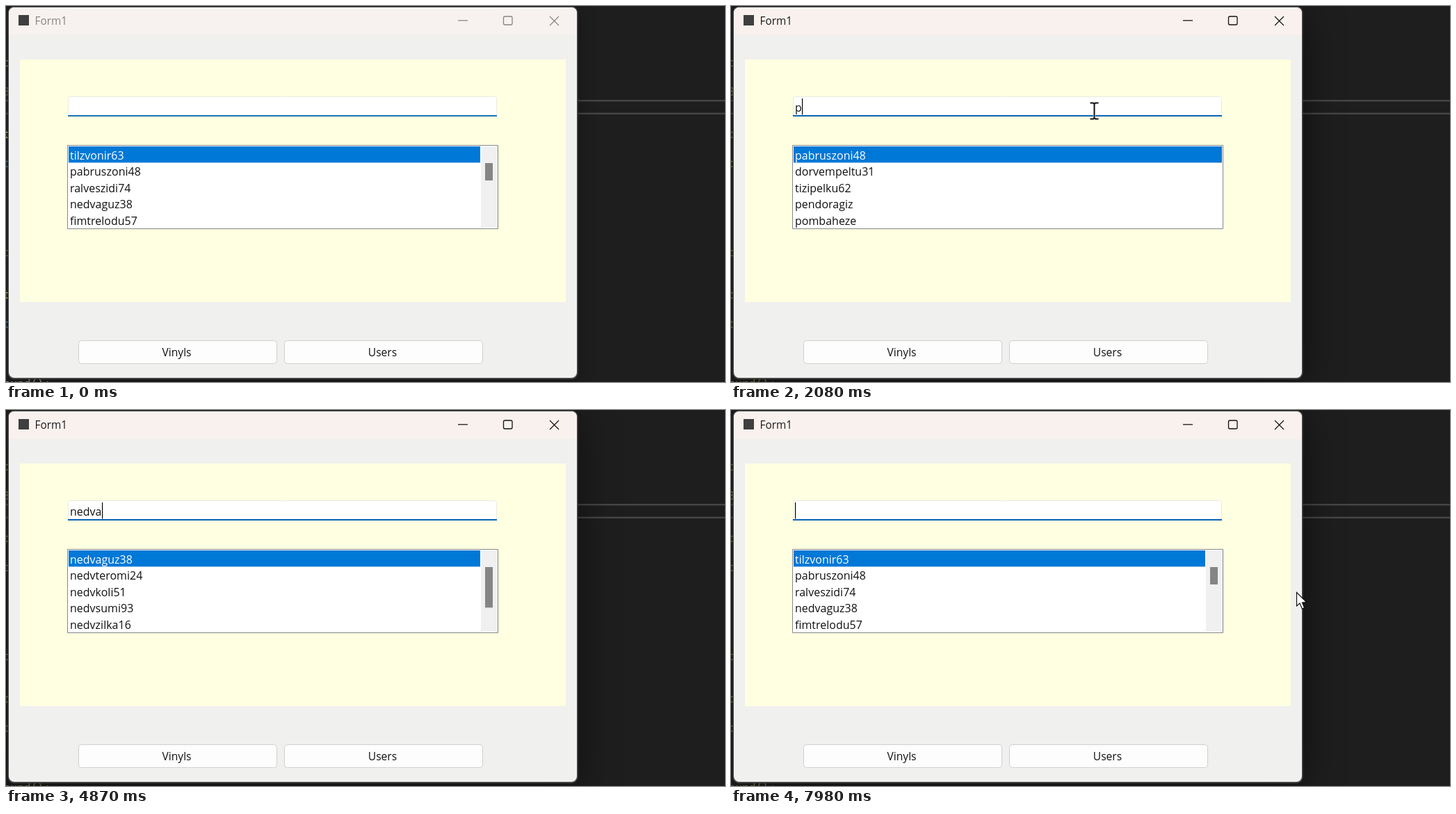
An HTML page with a canvas for the animation above (8000 ms loop, 1034 by 541 pixels).

```html
<!DOCTYPE html>
<html lang="en">
<head>
<meta charset="utf-8">
<title>Search form</title>
<style>
  html, body { margin: 0; width: 100%; height: 100%; overflow: hidden; background: #1e1e1e; }
  canvas { display: block; width: 100vw; height: 100vh; }
</style>
</head>
<body>
<canvas id="stage" width="1034" height="541"></canvas>
<script>
const ctx = document.getElementById('stage').getContext('2d');
const LOOP = 8000, PRESS = 930, RELEASE = 1260;
const BLINK = 530, LAG = 70;
const FROZEN = { from: 6270, to: 7300 };  // the form waits for its data
const UI = '"Open Sans", "Noto Sans", sans-serif';
const MONO = '16px "Noto Sans Mono", "DejaVu Sans Mono", monospace';

const users = [
  'tilzvonir63', 'pabruszoni48', 'ralveszidi74', 'nedvaguz38', 'fimtrelodu57',
  'dorvempeltu31', 'tizipelku62', 'nedvteromi24', 'nedvkoli51', 'nedvsumi93',
  'nedvzilka16', 'nedvoru45', 'pendoragiz', 'pombaheze'
];

// Runs of evenly spaced keys; '<' is backspace.
const burst = (start, every, keys) => [...keys].map((key, i) => ({ time: start + i * every, key }));
const strokes = [
  ...burst(1990, 200, 'pab'), ...burst(2870, 200, '<<<'),
  ...burst(3740, 200, 'nedv'), ...burst(4870, 0, 'a'),
  ...burst(FROZEN.from, 0, '<'), ...burst(FROZEN.to, 67, '<<<<')
];

// Pointer strokes along quadratic curves.
const move = (from, to, a, b, c) => ({ from, to, a, b, c });
const moves = [
  move(70, 800, [897, 502], [503, 346], [508, 152]),
  move(1200, 1460, [508, 152], [515, 152], [522, 151]),
  move(5880, 6480, [522, 151], [582, 195], [893, 231]),
  move(6480, 7100, [893, 231], [798, 227], [814, 246]),
  move(7300, 7980, [814, 246], [802, 262], [813, 262])
];

const frozen = t => t >= FROZEN.from && t < FROZEN.to;

const textAt = t => strokes.filter(s => s.time <= t)
  .reduce((s, { key }) => key === '<' ? s.slice(0, -1) : s + key, '');

function caretAt(t) {
  if (t < PRESS) return false;
  const last = Math.max(...[PRESS, RELEASE, ...strokes.map(s => s.time)].filter(e => e <= t));
  return frozen(t) || (t - last) % (2 * BLINK) < BLINK;
}

function pointerAt(t) {
  const m = moves.filter(m => m.from <= t).pop();
  // typing hides a resting pointer
  if (!m || strokes.some(s => s.time > m.to && s.time + 150 <= t)) return null;
  const p = Math.min(1, (t - m.from) / (m.to - m.from)), q = 1 - p;
  const [x, y] = [0, 1].map(i => Math.round(q * q * m.a[i] + 2 * p * q * m.b[i] + p * p * m.c[i]));
  const beam = t < FROZEN.from ? y < 165 || t > RELEASE : t < FROZEN.to && x < 821 && t < m.to && m.b[0] < m.c[0] && m.a[0] < m.b[0];
  return { x, y, beam };
}

function rect(x, y, w, h, color) {
  ctx.fillStyle = color;
  ctx.fillRect(x, y, w, h);
}

function box(x, y, w, h, r, fill, stroke, width = 1) {
  ctx.beginPath();
  ctx.roundRect(x, y, w, h, r);
  if (fill) { ctx.fillStyle = fill; ctx.fill(); }
  if (stroke) { ctx.strokeStyle = stroke; ctx.lineWidth = width; ctx.stroke(); }
}

function text(s, x, y, color, font = `16px ${UI}`, align = 'left') {
  ctx.font = font;
  ctx.textAlign = align;
  ctx.fillStyle = color;
  ctx.fillText(s, x, y);
}

function lines(color, width, ...paths) {
  ctx.strokeStyle = color;
  ctx.lineWidth = width;
  ctx.beginPath();
  for (const p of paths) {
    ctx.moveTo(p[0], p[1]);
    for (let i = 2; i < p.length; i += 2) ctx.lineTo(p[i], p[i + 1]);
  }
  ctx.stroke();
}

function drawEditor(t) {
  rect(0, 0, 1034, 541, '#1e1e1e');
  for (const y of [135, 153.6]) rect(0, y, 1034, 2.4, '#464646');
  const tint = color => t < PRESS ? color : '#75864e';
  const bit = (s, y, color) => text(s, 5, y, tint(color), MONO, 'right');
  bit('c', 87, '#a08a72');
  for (const y of [129, 360]) {
    bit(y < 200 ? '3' : 'c', y, '#6e675c');
    bit('t', y + 61, '#c9bd84');
    bit('t', y + 103, '#4385b5');
  }
  text('ound();', -3, 549, tint('#a5a08c'), MONO);
}

function drawWindow(t) {
  const active = t >= 800;
  const bar = !active ? '#f7f2ef' : t < 1460 ? '#f5f1f1' : '#f9f1ee';
  const ink = active ? '#111' : '#868482';

  ctx.save();
  ctx.shadowColor = `rgba(0,0,0,${active ? .5 : .3})`;
  ctx.shadowBlur = active ? 56 : 28;
  ctx.shadowOffsetY = 8;
  box(2.5, .5, 820, 536.5, 9, '#454545');
  ctx.restore();
  box(4, 2, 817, 533, 8, '#f0f0ee');
  box(4, 2, 817, 40, [8, 8, 0, 0], bar);

  rect(18, 13, 15, 15, '#3f3f3f');
  text('Form1', 41.5, 27, active ? '#1a1a1a' : '#868482', `15.4px ${UI}`);
  lines(ink, 1.2, [650, 20.8, 664, 20.8], [782, 15, 795, 28], [795, 15, 782, 28]);
  box(715.5, 15, 12.5, 12, 2, null, ink, 1.3);

  rect(20, 77, 785, 349, '#ffffe1');
  for (const [x, label] of [[104, 'Vinyls'], [400, 'Users']]) {
    box(x + .5, 481.5, 285, 33, 4, '#fdfdfd', '#d0d0d0');
    text(label, x + 141.5, 504, '#111', `15.6px ${UI}`, 'center');
  }
}

function drawField(t) {
  box(89.5, 130.5, 616, 27.5, 2, '#fff', '#ebebe0');
  const clicking = t >= PRESS && t < 1460;
  rect(89, 157, 617, clicking ? 1.6 : 2, clicking ? '#517fb0' : t < PRESS ? '#1a71b3' : '#0a62b6');
  text(textAt(t), 92, 152, '#111');
  if (caretAt(t)) rect(Math.round(92 + ctx.measureText(textAt(t)).width), 133, 1.2, 23.5, '#000');
}

function drawList(t) {
  const query = textAt((frozen(t) ? FROZEN.from : t) - LAG);
  const found = users.filter(u => u.includes(query));
  const scroll = found.length > 5;
  box(88.5, 200.5, 619, 120, 0, '#fff', '#82878c');
  rect(90, 202, scroll ? 592 : 616, 23.4, '#0078d7');
  found.slice(0, 5).forEach((name, i) =>
    text(name, 92, Math.round(220.8 + i * 23.45), i ? '#111' : '#fff'));
  if (scroll) {
    rect(683, 202, 24, 117, '#f0f0f0');
    rect(689, 226, 11, 70 * 5 / found.length, '#858585');
  }
}

function drawBeam(x, y) {
  const serif = s => [x - 6, y + s * 11.5, x - 1.5, y + s * 11.5, x, y + s * 10,
                      x + 1.5, y + s * 11.5, x + 6, y + s * 11.5];
  const shape = [serif(-1), [x, y - 10, x, y + 10], serif(1)];
  lines('rgba(255,255,255,.7)', 3.6, ...shape);
  lines('#111', 2, ...shape);
}

function drawArrow(x, y) {
  ctx.beginPath();
  [[.5, .5], [.5, 20], [5, 16], [8.3, 24], [11.6, 22.6], [8.4, 15], [14.5, 14.6]]
    .forEach(([dx, dy]) => ctx.lineTo(x + dx, y + dy));
  ctx.closePath();
  ctx.fillStyle = '#fff';
  ctx.fill();
  ctx.strokeStyle = '#111';
  ctx.lineWidth = 1.2;
  ctx.stroke();
}

function drawPointer(t) {
  const p = pointerAt(t);
  if (!p) return;
  if (p.beam) drawBeam(p.x + .5, p.y);
  else drawArrow(p.x, p.y);
  if (t >= PRESS && t < RELEASE) {
    ctx.beginPath();
    ctx.arc(p.x - 2, p.y - 1, 17, 0, Math.PI * 2);
    ctx.fillStyle = 'rgba(246,246,20,.55)';
    ctx.fill();
  }
}

function frame(now) {
  const t = now % LOOP;
  drawEditor(t);
  drawWindow(t);
  drawField(t);
  drawList(t);
  drawPointer(t);
  requestAnimationFrame(frame);
}
requestAnimationFrame(frame);
</script>
</body>
</html>
```
